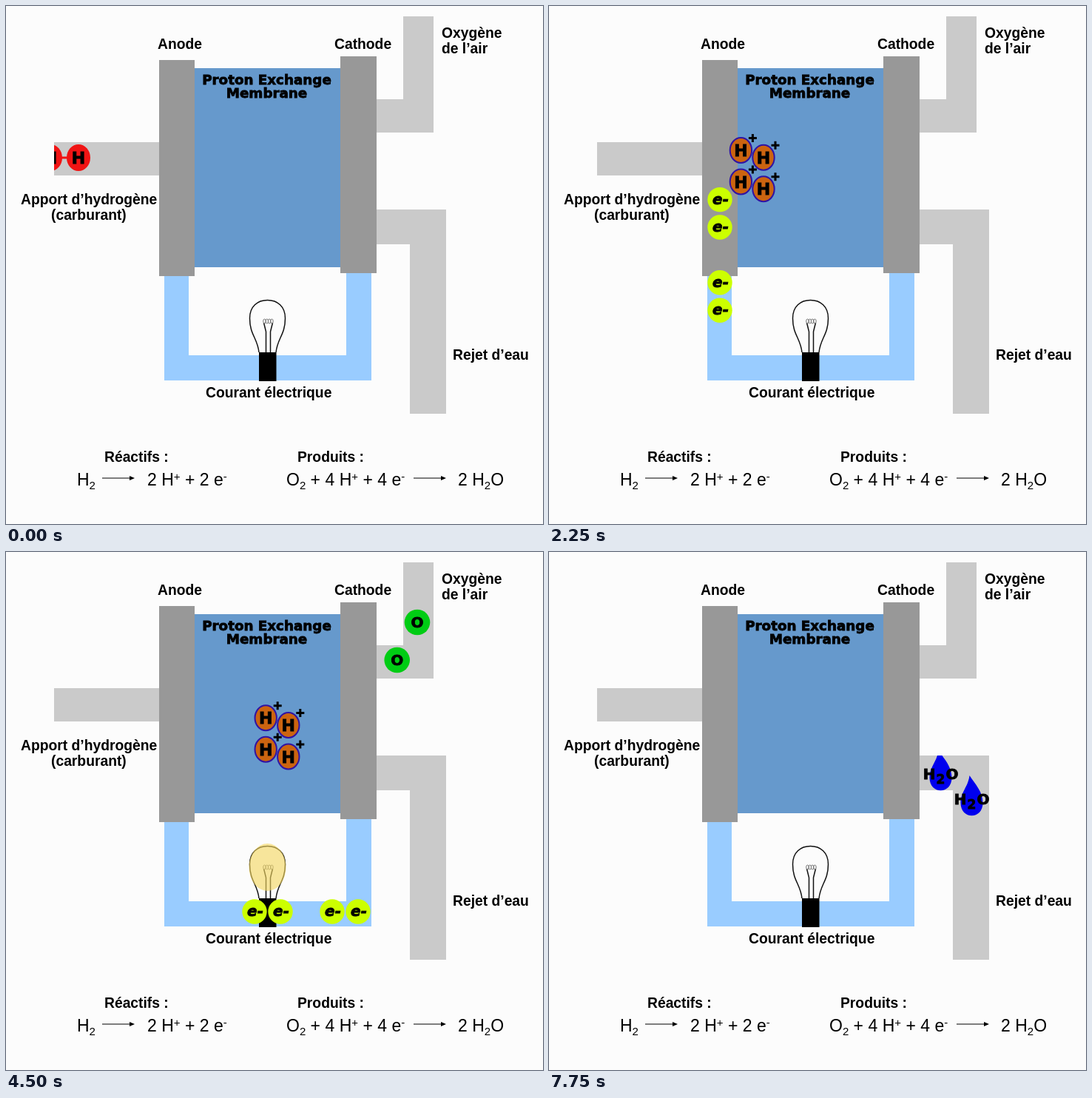
These frames come from a looping animation (726x700 px, 8 s). An HTML page with a canvas:

```html
<!DOCTYPE html>
<html lang="fr">
<head>
<meta charset="utf-8">
<style>
html, body { margin: 0; width: 726px; height: 700px; overflow: hidden; background: #fcfcfc; }
canvas { display: block; }
</style>
</head>
<body>
<canvas id="stage" width="726" height="700"></canvas>
<script>
const ctx = document.getElementById('stage').getContext('2d');
const STEP = 250, STEPS = 32, LAG = 3;
const SANS = '"Liberation Sans", Arial, sans-serif';
const HEAVY = '"DejaVu Sans", sans-serif';

function rect(color, x1, y1, x2, y2) {
  ctx.fillStyle = color;
  ctx.fillRect(x1, y1, x2 - x1, y2 - y1);
}

function oval(color, x, y, rx, ry = rx) {
  ctx.beginPath();
  ctx.ellipse(x, y, rx, ry, 0, 0, Math.PI * 2);
  ctx.fillStyle = color;
  ctx.fill();
}

function text(str, x, y, font, align = 'left') {
  ctx.font = font;
  ctx.textAlign = align;
  ctx.fillStyle = '#000';
  ctx.fillText(str, x, y);
  return ctx.measureText(str).width;
}

const label = (str, x, y) => text(str, x, y, `bold 19.3px ${SANS}`);

// Bold text with a thin outline for a black weight.
function heavy(str, x, y, size, style = '') {
  text(str, x, y, `${style} bold ${size}px ${HEAVY}`, 'center');
  ctx.lineWidth = 0.8;
  ctx.strokeStyle = '#000';
  ctx.strokeText(str, x, y);
}

// "_" lowers and "^" raises the character that follows.
function formula(str, x, y) {
  for (const [part] of str.matchAll(/[_^].|[^_^]+/g)) {
    const shift = { _: 5, '^': -7 }[part[0]];
    x += shift
      ? text(part[1], x, y + shift, `15px ${SANS}`)
      : text(part, x, y, `23px ${SANS}`);
  }
}

function arrow(x1, x2, y) {
  rect('#000', x1, y - 0.5, x2 - 5, y + 0.5);
  ctx.beginPath();
  ctx.moveTo(x2, y);
  ctx.lineTo(x2 - 7, y - 3);
  ctx.lineTo(x2 - 7, y + 3);
  ctx.fill();
}

function bulb(lit) {
  ctx.lineWidth = 1.5;
  ctx.strokeStyle = '#111';
  ctx.beginPath();
  ctx.moveTo(342, 468);
  ctx.bezierCurveTo(340, 449, 329.5, 444, 329.5, 422);
  ctx.bezierCurveTo(329.5, 406, 340, 397.5, 353.5, 397.5);
  ctx.bezierCurveTo(367, 397.5, 377.5, 406, 377.5, 422);
  ctx.bezierCurveTo(377.5, 444, 367, 449, 365, 468);
  ctx.fillStyle = '#fcfcfc';
  ctx.fill();
  ctx.stroke();
  ctx.beginPath();
  ctx.moveTo(351.5, 468);
  ctx.lineTo(351.5, 440);
  ctx.lineTo(348.5, 428);
  ctx.moveTo(357.5, 468);
  ctx.lineTo(357.5, 440);
  ctx.lineTo(360.5, 428);
  ctx.stroke();
  ctx.lineWidth = 1;
  ctx.strokeStyle = '#777';
  for (let i = 0; i < 4; i++) {
    ctx.beginPath();
    ctx.ellipse(349.5 + i * 3.3, 426, 1.8, 3, 0, 0, 7);
    ctx.stroke();
  }
  if (lit) oval('rgba(246,216,98,0.62)', 353.5, 426, 25, 32);
  rect('#000', 342, 468, 365.5, 507);
}

function scene(lit) {
  const pipe = '#cacaca', wire = '#99ccff', plate = '#989898';
  rect('#fcfcfc', 0, 0, 726, 700);
  rect(pipe, 65, 184, 207, 229);
  rect(pipe, 537, 14, 578, 171);
  rect(pipe, 500, 126, 538, 171);
  rect(pipe, 500, 275, 595, 322);
  rect(pipe, 546, 321, 595, 551);
  rect(wire, 214, 360, 247, 506);
  rect(wire, 214, 472, 494, 506);
  rect(wire, 460, 355, 494, 506);
  rect('#6699cc', 254, 84, 453, 353);
  rect(plate, 207, 73, 255, 365);
  rect(plate, 452, 68, 501, 361);
  bulb(lit);

  heavy('Proton Exchange', 352.5, 106, 18.3);
  heavy('Membrane', 352.5, 124, 18.3);
  label('Anode', 205, 58);
  label('Cathode', 444, 58);
  label('Oxygène', 589, 43);
  label('de l’air', 589, 64);
  label('Apport d’hydrogène', 20, 268);
  label('(carburant)', 61, 289);
  label('Rejet d’eau', 604, 478);
  label('Courant électrique', 270, 529);
  label('Réactifs :', 133, 616);
  label('Produits :', 394, 616);
  formula('H_2', 96, 648);
  formula('2 H^+ + 2 e^-', 191, 648);
  formula('O_2 + 4 H^+ + 4 e^-', 379, 648);
  formula('2 H_2O', 611, 648);
  arrow(130, 174, 638);
  arrow(551, 595, 638);
}

function molecule(k) {
  const x = 98 + 49 * k, y = 205;
  ctx.save();
  ctx.beginPath();
  ctx.rect(65, 150, 300, 110);
  ctx.clip();
  rect('#f01414', x - 38, y - 1.5, x, y + 1.5);
  for (const cx of [x - 38, x]) {
    oval('#f01414', cx, y, 16, 18);
    heavy('H', cx, y + 8, 22);
  }
  ctx.restore();
}

function proton(x, y) {
  oval('#cc6410', x, y, 14.7, 17);
  ctx.lineWidth = 2;
  ctx.strokeStyle = '#3014a4';
  ctx.stroke();
  heavy('H', x, y + 8, 22);
  rect('#000', x + 10.5, y - 18, x + 21.5, y - 15);
  rect('#000', x + 14.5, y - 22, x + 17.5, y - 11);
}

function protons(k) {
  const x = 239 + 10.2 * k, y = 188.5 + 3.25 * k;
  proton(x, y);
  proton(x, y + 42.5);
}

// u counts steps from the lower left corner of the wire.
function electron(u) {
  let x = 231, y = 486;
  if (u < 0) y += 37.4 * u;
  else if (u < 7) x += 35 * u;
  else {
    x = u === 7 ? 476 : 474.5;
    y -= 26.5 * (u - 7);
  }
  oval('#ccff00', x, y, 16.7);
  heavy('e-', x + 1, y + 6, 20, 'italic');
}

function oxygen(k) {
  let x = 556, y = 44 + 25.5 * Math.min(k, 4);
  if (k > 4) x -= 27.3 * Math.min(k - 4, 3);
  if (k > 7) y += 21.3 * (k - 7);
  oval('#00cc14', x, y, 17.3);
  heavy('O', x, y + 7, 20);
}

function water(k) {
  const x = [502, 529.5, 550.5, 571.5][Math.min(k, 3)];
  const y = 300 + 34 * Math.max(0, k - 3);
  ctx.save();
  ctx.beginPath();
  ctx.rect(450, 275, 200, 276);
  ctx.clip();
  ctx.beginPath();
  ctx.moveTo(x - 3, y - 32);
  ctx.bezierCurveTo(x - 5, y - 16, x - 15, y - 10, x - 15, y + 5);
  ctx.bezierCurveTo(x - 15, y + 28, x + 15, y + 28, x + 15, y + 5);
  ctx.bezierCurveTo(x + 15, y - 10, x + 5, y - 20, x - 3, y - 32);
  ctx.fillStyle = '#0000ee';
  ctx.fill();
  ctx.restore();
  heavy('H', x - 15.5, y + 7, 20);
  heavy('2', x, y + 13, 17);
  heavy('O', x + 15.5, y + 7, 20);
}

// Tips and notches in turn.
const BURST = [
  [168, 205], [195, 196], [181, 165], [207, 181], [212, 164], [226, 177],
  [237, 154], [244, 179], [261, 163], [258, 185], [277, 181], [265, 195],
  [282, 197], [265, 208], [280, 213], [257, 217], [264, 253], [247, 224],
  [233, 223], [236, 261], [222, 235], [211, 260], [206, 234], [184, 250],
  [197, 224], [174, 231], [194, 213]
];

function burst() {
  ctx.beginPath();
  for (const [x, y] of BURST) ctx.lineTo(x, y);
  ctx.fillStyle = '#ff3300';
  ctx.fill();
}

function draw(n) {
  scene(n >= 14 && n <= 19);
  // The same reaction runs twice, the second one a few steps later.
  for (const k of [n, n - LAG]) {
    if (k >= 0 && k < 4) molecule(k);
    if (k >= 4 && k <= 26) protons(k - 4);
    if (k >= 5 && k <= 26) {
      electron(k - 12);
      electron(k - 11);
    }
    if (k >= 13 && k <= 26) oxygen(k - 13);
    if (k >= 27) water(k - 27);
  }
  if (n === 4 || n === 4 + LAG) burst();
}

function tick() {
  draw(Math.floor(performance.now() / STEP) % STEPS);
  requestAnimationFrame(tick);
}
tick();
</script>
</body>
</html>
```
